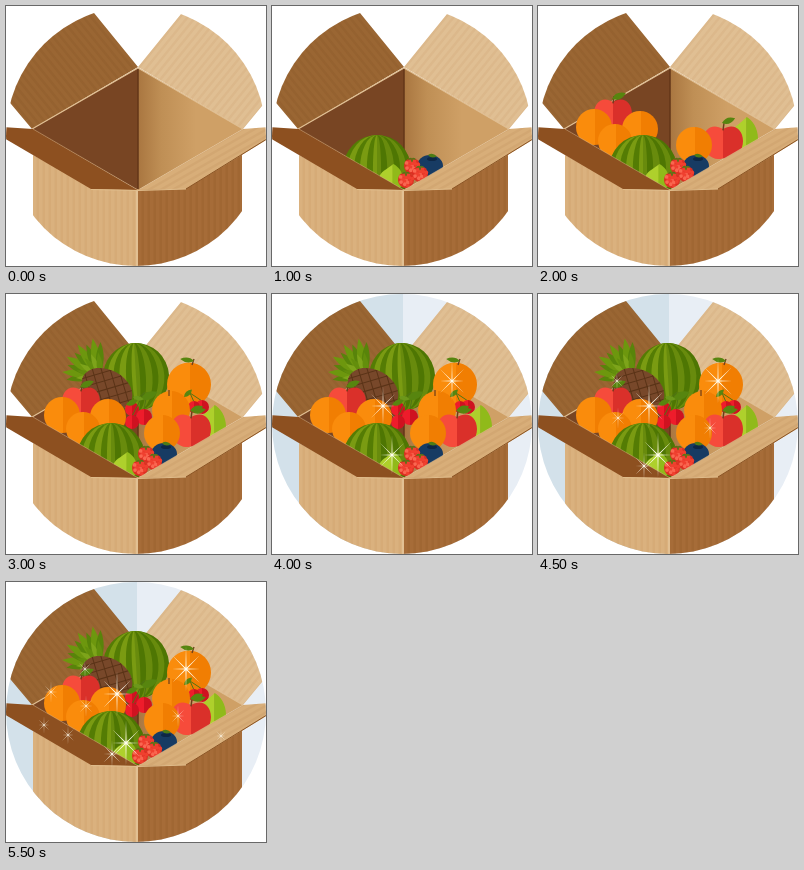
An HTML page with a canvas for the animation above (6500 ms loop, 260x260 px).

```html
<!DOCTYPE html>
<html lang="en">
<head>
<meta charset="utf-8">
<title>Fruit box</title>
<style>
html, body { margin: 0; width: 100%; height: 100%; overflow: hidden; background: #fff; }
canvas { display: block; width: 260px; height: 260px; }
</style>
</head>
<body>
<canvas id="stage" width="260" height="260"></canvas>
<script>
const ctx = document.getElementById('stage').getContext('2d');
const LOOP = 6500;

function poly(pts, fill) {
  ctx.beginPath();
  for (let i = 0; i < pts.length; i += 2) ctx.lineTo(pts[i], pts[i + 1]);
  ctx.closePath();
  ctx.fillStyle = fill;
  ctx.fill();
}

function line(pts, color, width = 1) {
  ctx.beginPath();
  for (let i = 0; i < pts.length; i += 2) ctx.lineTo(pts[i], pts[i + 1]);
  ctx.strokeStyle = color;
  ctx.lineWidth = width;
  ctx.stroke();
}

function oval(x, y, rx, ry, fill, turn = 0) {
  ctx.beginPath();
  ctx.ellipse(x, y, rx, ry, turn, 0, Math.PI * 2);
  ctx.fillStyle = fill;
  ctx.fill();
}

// Cardboard panel with corrugation lines running along `angle`
function panel(pts, fill, stripe, angle, gap = 6) {
  ctx.save();
  poly(pts, fill);
  ctx.clip();
  ctx.translate(pts[0], pts[1]);
  ctx.rotate(angle);
  ctx.fillStyle = stripe;
  for (let y = -282; y < 282; y += gap) ctx.fillRect(-300, y, 600, gap * 0.4);
  ctx.restore();
}

// Fills the current path in two tones split at x
function halves(x, left, right) {
  ctx.save();
  ctx.clip();
  ctx.fillStyle = left;
  ctx.fillRect(0, 0, x, 260);
  ctx.fillStyle = right;
  ctx.fillRect(x, 0, 260 - x, 260);
  ctx.restore();
}

function leaf(x, y, len, angle, color = '#57850f', fat = 0.42) {
  ctx.save();
  ctx.translate(x, y);
  ctx.rotate(angle);
  ctx.beginPath();
  ctx.moveTo(0, 0);
  ctx.quadraticCurveTo(len * 0.45, -len * fat, len, 0);
  ctx.quadraticCurveTo(len * 0.45, len * fat, 0, 0);
  ctx.fillStyle = color;
  ctx.fill();
  ctx.restore();
}

function orange(x, y, r) {
  ctx.beginPath();
  ctx.arc(x, y, r, 0, Math.PI * 2);
  halves(x + 1, '#fa8c0c', '#f17e02');
}

function apple(x, y, w, h) {
  ctx.beginPath();
  ctx.moveTo(x, y - h * 0.72);
  ctx.bezierCurveTo(x + w * 0.5, y - h * 1.08, x + w, y - h * 0.75, x + w, y - h * 0.05);
  ctx.bezierCurveTo(x + w, y + h * 0.6, x + w * 0.5, y + h * 1.12, x, y + h * 0.9);
  ctx.bezierCurveTo(x - w * 0.5, y + h * 1.12, x - w, y + h * 0.6, x - w, y - h * 0.05);
  ctx.bezierCurveTo(x - w, y - h * 0.75, x - w * 0.5, y - h * 1.08, x, y - h * 0.72);
  halves(x, '#f64b3b', '#da302a');
  line([x, y - h * 0.65, x + 1, y - h * 1.05], '#6b3c1b', 1.4);
}

function pear(x, y, w, h) {
  const tip = x + w * 0.2;
  ctx.beginPath();
  ctx.moveTo(tip, y - h);
  ctx.bezierCurveTo(x + w * 0.6, y - h * 0.8, x + w, y - h * 0.4, x + w, y + h * 0.2);
  ctx.bezierCurveTo(x + w, y + h, x + w * 0.4, y + h, x, y + h);
  ctx.bezierCurveTo(x - w * 0.4, y + h, x - w, y + h, x - w, y + h * 0.2);
  ctx.bezierCurveTo(x - w, y - h * 0.4, x - w * 0.3, y - h * 0.6, tip, y - h);
  halves(x + w * 0.15, '#aed02c', '#90ba1a');
}

function melon(x, y, rx, ry, turn) {
  ctx.save();
  ctx.translate(x, y);
  ctx.rotate(turn);
  [1, 0.86, 0.68, 0.5, 0.3, 0.12].forEach((k, i) =>
    oval(0, 0, rx * k, ry, i % 2 ? '#7a9b12' : '#547c04'));
  ctx.beginPath();
  ctx.ellipse(0, 0, rx, ry, 0, -Math.PI / 2, Math.PI / 2);
  ctx.fillStyle = 'rgba(65,105,0,.3)';
  ctx.fill();
  ctx.restore();
}

// Round berry made of small beads
function raspberry(x, y, r) {
  oval(x, y, r, r, '#dc2f22');
  for (let i = 0; i < 14; i++) {
    const a = i * 2.4, d = r * 0.84 * Math.sqrt(i / 14);
    oval(x + Math.cos(a) * d, y + Math.sin(a) * d, 1.9, 1.9, i % 3 ? '#f0402f' : '#fa6650');
  }
  for (let a = -1; a <= 1; a++) leaf(x, y - r, 4.5, Math.PI / 2 + a * 1.2, '#4d7c16');
}

function cherry(x, y, r, sx, sy) {
  line([x, y - r + 1, sx, sy], '#4f7414', 1);
  ctx.beginPath();
  ctx.arc(x, y, r, 0, Math.PI * 2);
  halves(x, '#ee1c2b', '#cf1220');
}

function pineapple() {
  for (let i = 0; i < 9; i++)
    leaf(93, 81, 33 + (i % 2) * 4, 3.0 + i * 0.22, i % 2 ? '#6d970e' : '#58840a', 0.24);
  for (let i = 0; i < 6; i++)
    leaf(95, 83, 25, 3.1 + i * 0.3, i % 2 ? '#638e0c' : '#7da41a', 0.24);
  ctx.save();
  ctx.translate(101, 95);
  ctx.rotate(0.5);
  oval(0, 0, 27, 19, '#78482a');
  ctx.clip();
  for (let k = -60; k <= 60; k += 12) {
    line([k - 30, -30, k + 30, 30], '#5a3317', 1);
    line([k - 30, 30, k + 30, -30], '#5a3317', 1);
  }
  ctx.restore();
}

function backFruit() {
  melon(130, 83, 33, 34, -0.06);
  pineapple();
  orange(183, 90.5, 22);
  line([186, 71, 188, 65], '#6b3c1b', 1.3);
  leaf(188, 67, 14, Math.PI + 0.15, '#57850f', 0.34);
  cherry(196, 113, 7, 184, 99);
  cherry(188, 113, 6, 184, 99);
  orange(165, 116, 19);
  line([163, 102, 163, 96], '#6b3c1b', 1.2);
  leaf(178, 103, 11, -0.75);
  leaf(186, 118, 14, -0.2);
  cherry(126, 115, 7, 139, 98);
  cherry(138, 123, 8, 141, 98);
  cherry(126, 128, 7, 138, 99);
  leaf(120, 111, 13, -0.4);
  leaf(135, 105, 18, -0.4);
  leaf(127, 103, 11, 0.2, '#6c971a');
}

function middleFruit() {
  apple(75, 109, 19, 18);
  leaf(74, 93, 15, -0.4);
  orange(56, 121, 18);
  orange(102, 123, 18);
  orange(77, 135, 17);
  pear(206, 129, 14, 18);
  apple(185, 136, 20, 18);
  leaf(184, 117, 14, -0.35);
  orange(156, 139, 18);
}

function frontFruit() {
  melon(105, 163, 34, 34, 0);
  pear(119, 171, 12, 13);
  oval(158, 160, 13, 11, '#173b63');
  oval(160, 153, 5, 2, '#0e2746');
  leaf(156, 149, 9, 0.15, '#4d7c16');
  raspberry(140, 160, 8);
  raspberry(148, 168, 8);
  raspberry(134, 174, 8);
}

function boxBack() {
  panel([132, 61, 88, 7, 40, -40, -20, 70, 5, 98, 26, 123], '#9a6633', 'rgba(105,60,22,.1)', Math.atan2(-54, -44));
  panel([132, 61, 175, 8, 230, -40, 290, 60, 256, 100, 237, 123], '#e0bf93', 'rgba(190,145,92,.14)', Math.atan2(-53, 43));
  poly([26, 123, 132, 62, 132, 184], '#784523');
  const g = ctx.createLinearGradient(132, 0, 190, 0);
  g.addColorStop(0, '#a97640');
  g.addColorStop(0.4, '#bf8f55');
  g.addColorStop(1, '#cfa066');
  poly([132, 62, 237, 123, 132, 184], g);
  line([132, 62, 132, 183], '#633618', 1.5);
  line([26, 123, 132, 62, 237, 123], '#dfbd90', 1.2);
}

function boxFront() {
  panel([27, 149, 85, 180, 132, 183, 132, 262, 27, 262], '#dab17e', 'rgba(195,145,90,.2)', Math.PI / 2);
  panel([132, 183, 180, 180, 236, 147, 236, 262, 132, 262], '#a66c38', 'rgba(130,75,30,.16)', Math.PI / 2);
  line([131, 184, 131, 260], '#e2c093', 2);
  poly([-2, 121, 27, 123, 132, 184, 85, 183, -2, 132], '#8d5020');
  panel([262, 121, 237, 123, 132, 184, 180, 183, 262, 133], '#d8ae79', 'rgba(185,135,82,.18)', -0.52);
  line([85, 183.5, 132, 184.5], '#e0bd8c');
  line([132, 184.5, 180, 183], '#e0bd8c');
  line([180, 183, 260, 133.5], '#8a5425');
  line([27, 123, 132, 184, 237, 123], 'rgba(228,196,150,.5)', 0.8);
}

// Thin eight-rayed glint, tallest along its upright axis
function spark(x, y, r, turn = 0) {
  const rays = [0.6, 0.85, 1, 0.85];
  ctx.beginPath();
  for (let i = 0; i < 16; i++) {
    const d = r * (i % 2 ? 0.06 : rays[i / 2 % 4]);
    const a = turn + i * Math.PI / 8;
    ctx.lineTo(x + Math.cos(a) * d, y + Math.sin(a) * d);
  }
  ctx.closePath();
  ctx.fillStyle = '#fffdf0';
  ctx.fill();
}

function sparks(t) {
  const big = t < 4500 ? 20 : 23;
  spark(111, 112, big);
  spark(180, 87, big);
  spark(120, 161, big);
  if (t >= 4500) {
    spark(79, 87, 10);
    spark(80, 124, 11);
    spark(172, 134, 11);
    spark(106, 172, 14);
  }
  if (t >= 5000) {
    spark(38, 143, 9);
    spark(62, 153, t < 5500 ? 8 : 10);
    spark(215, 154, t < 5500 ? 7 : 8);
  }
  if (t >= 5500) spark(45, 110, 11);
}

function draw(t) {
  ctx.fillStyle = '#fff';
  ctx.fillRect(0, 0, 260, 260);
  ctx.save();
  ctx.beginPath();
  ctx.arc(130, 130, 130, 0, Math.PI * 2);
  ctx.clip();
  if (t >= 4000) {
    ctx.fillStyle = '#d3e1ea';
    ctx.fillRect(0, 0, 131, 260);
    ctx.fillStyle = '#e8eef5';
    ctx.fillRect(131, 0, 129, 260);
  }
  boxBack();
  if (t >= 3000) backFruit();
  if (t >= 2000) middleFruit();
  if (t >= 1000) frontFruit();
  boxFront();
  if (t >= 4000) sparks(t);
  ctx.restore();
}

const start = performance.now();
function tick() {
  draw((performance.now() - start) % LOOP);
  requestAnimationFrame(tick);
}
tick();
</script>
</body>
</html>
```
